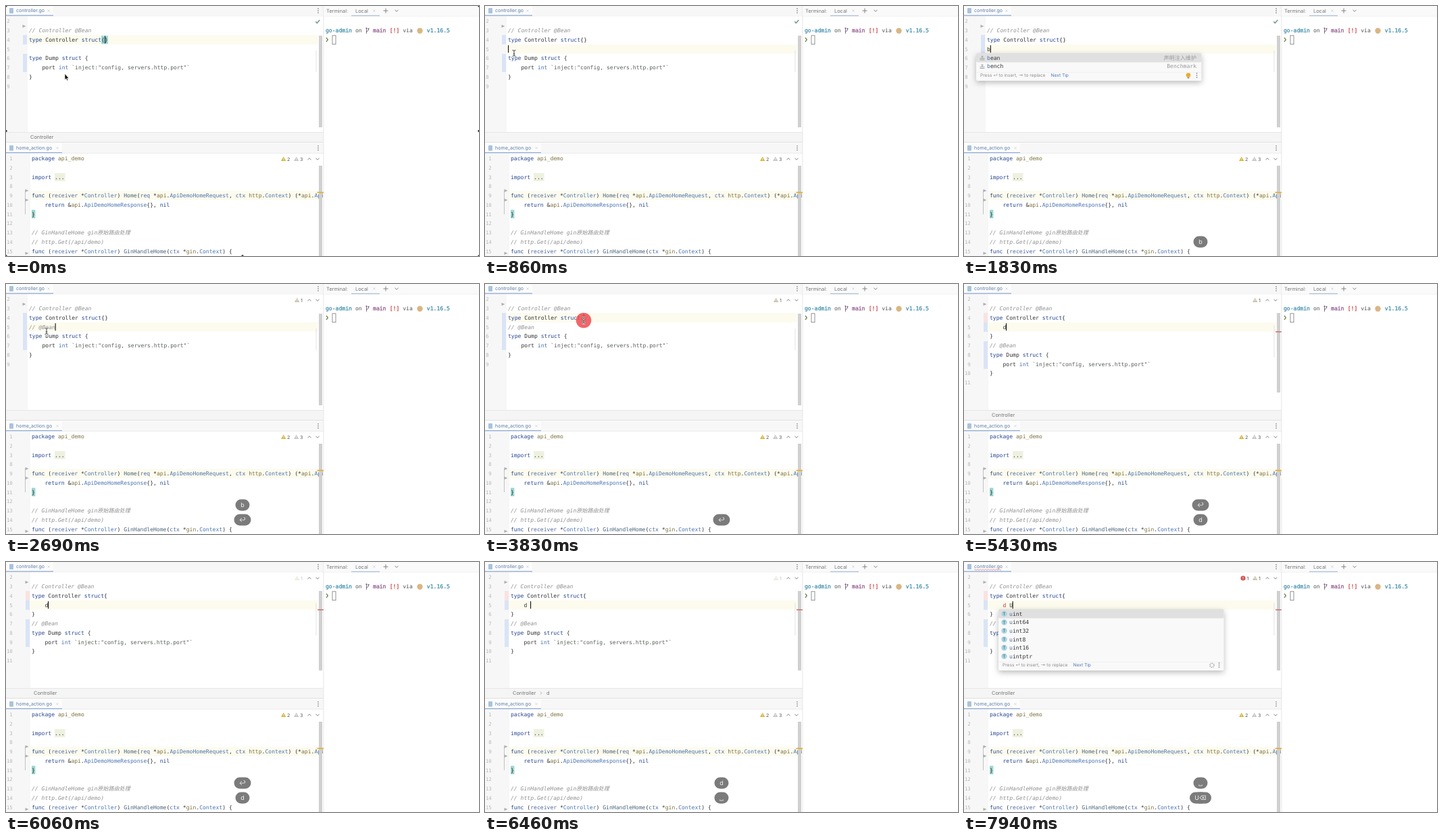
An HTML page that plays this animation: 700 by 371 pixels, repeating every 8 s.

```html
<!DOCTYPE html>
<html lang="en">
<head>
<meta charset="utf-8">
<title>Editor demo</title>
<style>
  html, body { margin: 0; width: 100%; height: 100%; overflow: hidden; background: #fff; }
  svg { display: block; width: 100vw; height: 100vh; }
  text { white-space: pre; text-rendering: geometricPrecision; }
  .mono { font: 8.09px "DejaVu Sans Mono", "Noto Sans CJK SC", "Noto Sans CJK", monospace; fill: #333; }
  .ui { font: 7.1px Inter, Roboto, "DejaVu Sans", sans-serif; fill: #555; }
  .title { fill: #5c7ca8; }
  .crumb { font-size: 7.4px; fill: #777; }
  .tip { font-size: 6.6px; fill: #8c8c8c; }
  .num { font-size: 7.4px; fill: #b8b8b8; text-anchor: end; }
  .end { text-anchor: end; }
  .key { font: 9px Inter, "DejaVu Sans", sans-serif; fill: #f4f4f4; text-anchor: middle; }
  .strong { stroke: currentColor; stroke-width: .25; }
  .comment { fill: #8f8f8f; font-style: italic; }
  .word { fill: #26468f; }
  .type { fill: #4a72b2; }
  .string { fill: #575f57; }
  .pkg { fill: #7d713f; }
  .func { fill: #48627a; }
  .name { fill: #4f69a0; }
  .error { fill: #c43a3a; }
  .line { fill: none; stroke: #777; stroke-width: .9; }
  .popup { filter: drop-shadow(0 3px 4px #0004); }
</style>
</head>
<body>
<svg id="stage" viewBox="0 0 700 371" preserveAspectRatio="none"></svg>
<script>
const LOOP = 8000;
const PITCH = 13.75;
const BEAN = 2060, CLICK = 3800, ENTER = 4230, SPACE = 6230, UPPER = 7430;
const parts = [];

const add = svg => parts.push(svg);
const at = (from, to, ...svg) =>
  parts.push(`<g data-from="${from}" data-to="${to}">${svg.join('')}</g>`);

const rect = (x, y, w, h, fill, more = '') =>
  `<rect x="${x}" y="${y}" width="${w}" height="${h}" fill="${fill}" ${more}/>`;
const path = (d, more = '') => `<path class="line" d="${d}" ${more}/>`;
const label = (x, y, str, cls = 'ui') => `<text class="${cls}" x="${x}" y="${y}">${str}</text>`;
const dots = (x, y) => [-3, 0, 3].map(d => `<circle cx="${x}" cy="${y + d}" r=".8" fill="#666"/>`).join('');
const up = (x, y) => path(`M${x - 2.5} ${y + 1.3}l2.5-2.6 2.5 2.6`);
const down = (x, y) => path(`M${x - 2.5} ${y - 1.3}l2.5 2.6 2.5-2.6`);
const cross = (x, y) => path(`M${x - 1.6} ${y - 1.6}l3.2 3.2m0-3.2l-3.2 3.2`, 'style="stroke:#d5d5d5"');

// Syntax colouring
const RULES = [
  ['comment', '//.*'],
  ['string', '`.*`'],
  ['word', '\\b(?:type|struct|func|return|package|import|nil)\\b'],
  ['type', '\\b(?:int|ApiDemo\\w+|Api$|Context|Controller(?=\\)))\\b'],
  ['func', '\\b(?:Home|GinHandleHome)(?=\\()'],
  ['pkg', '\\b(?:api_demo|api|http|gin)\\b'],
  ['name', '\\b(?:receiver|req|ctx)\\b']
];
const SYNTAX = new RegExp(RULES.map(([, r]) => `(${r})`).join('|'), 'g');
const paint = src => src.replace(SYNTAX, (hit, ...groups) =>
  `<tspan class="${RULES[groups.findIndex((g, i) => i < RULES.length && g)][0]}">${hit}</tspan>`);

const rowY = n => 50 + PITCH * (n - 4);
const code = (x, y, src) => label(x, y + 2.9, paint(src), 'mono');
const number = (x, y, n) => label(x, y + 2.8, n, 'mono num');
const numbers = (x, last) => {
  let out = '';
  for (let n = 2; n <= last; n++) out += number(x, rowY(n), n);
  return out;
};
const rowBand = n => rect(32, rowY(n) - 6.8, 430, 13.6, '#fcfbee');
const caret = (x, n) => rect(x, rowY(n) - 5.5, 1.1, 11, '#111');
const changed = (x, top, bottom, fill = '#dae4f6') => rect(x, top, 6, bottom - top, fill);
const fold = (x, y) => `<path d="M${x - 2.5} ${y - 2.3}l5 2.3-5 2.3z" fill="#b0b0b0"/>`;

const warning = (x, y, n, color, opacity = 1) => `<g opacity="${opacity}">
  <path d="M${x} ${y + 3}l3.7-6.4 3.7 6.4z" fill="${color}"/>
  <path d="M${x + 3.7} ${y - 1.2}v2m0 .7v.7" stroke="#fff" stroke-width=".8"/>
  ${label(x + 9, y + 2.6, n)}</g>`;
const arrows = y => up(449, y) + down(461, y);

// Editor frames and terminal
const tab = (y, title, width) => rect(0, y, 470, 14.5, '#f7f7f7')
  + rect(0, y, width, 14, '#fcfcfc') + rect(0, y + 13.4, width, 1.2, '#86a5d0')
  + rect(5, y + 3, 6, 8, '#a9c3de', 'rx="1"')
  + label(15, y + 9.4, title, 'ui title') + cross(width - 7, y + 7) + dots(462, y + 7);

add(rect(0, 0, 700, 371, '#fff'));
at(0, ENTER, rect(0, 15, 32, 172, '#f7f7f7'));
at(ENTER, LOOP, rect(0, 15, 36, 172, '#f7f7f7'));
add(rect(0, 217, 36, 154, '#f7f7f7'));
add(rect(0, 14.6, 470, .6, '#e2e2e2') + tab(0, 'controller.go', 70));
add(rect(0, 187, 470, 15, '#f5f5f5') + rect(0, 187, 470, .6, '#dedede'));
add(tab(203.7, 'home_action.go', 83) + rect(0, 201.8, 470, .8, '#d5d5d5') + rect(83, 218, 387, .6, '#e2e2e2'));
add(rect(469.5, 0, .9, 371, '#e3e3e3') + rect(470.4, 0, 229.6, 15, '#fafafa') + rect(470.4, 14.8, 229.6, .6, '#e8e8e8'));
add(label(474, 9.7, 'Terminal:', 'ui crumb') + label(517, 9.7, 'Local', 'ui crumb')
  + rect(511, 13.8, 42, 1.1, '#a3b9d6') + cross(545, 7)
  + path('M558.5 7h7m-3.5-3.5v7') + down(578, 7));

const prompt = [
  [0, 'go-admin', '#3f8dab', 'strong'], [9, 'on', '#555', ''], [14.35, 'main', '#8f5389', 'strong'],
  [19.4, '[!]', '#cc4646', 'strong'], [23.4, 'via', '#555', ''], [30.7, 'v1.16.5', '#3f8dab', 'strong']
];
for (const [col, str, color, weight] of prompt)
  add(`<text class="mono ${weight}" x="${473 + col * 4.88}" y="39.4" style="fill:${color};color:${color}">${str}</text>`);
add(path('M533.5 41v-8m0 5q3-.5 3-3.5', 'style="stroke:#765b78"')
  + '<circle cx="533.5" cy="33" r="1.1" fill="#765b78"/><circle cx="536.5" cy="33.8" r="1.1" fill="#765b78"/>');
add('<circle cx="612.5" cy="36.7" r="4.2" fill="#dab682"/>');
add(path('M474 46.8l2.3 3.2-2.3 3.2', 'style="stroke:#678444;stroke-width:1.3"')
  + '<rect x="483" y="43.8" width="5" height="13" fill="none" stroke="#777" stroke-width=".8"/>');

// Lower editor
const lower = {
  1: 'package api_demo', 2: '', 3: 'import ...', 8: '',
  9: 'func (receiver *Controller) Home(req *api.ApiDemoHomeRequest, ctx http.Context) (*api.Api',
  10: '    return &amp;api.ApiDemoHomeResponse{}, nil', 11: '}', 12: '',
  13: '// GinHandleHome gin原始路由处理', 14: '// http.Get(/api/demo)',
  15: 'func (receiver *Controller) GinHandleHome(ctx *gin.Context) {'
};
add(rect(36, 274.5, 434, 13.6, '#fcfbee') + rect(72, 248, 15.5, 12, '#eef1df') + rect(38, 302.5, 5.4, 12.5, '#9bd5d0'));
add('<clipPath id="pane"><rect y="217" width="469" height="154"/></clipPath><g clip-path="url(#pane)">'
  + Object.entries(lower).map(([n, src], i) =>
    number(9.8, 226.3 + i * PITCH, n) + code(38, 226.3 + i * PITCH, src)).join('') + '</g>');
add(path('M28.5 274v35', 'style="stroke:#bbb"') + fold(31, 274) + fold(31, 288) + fold(31, 367));
add(warning(407, 227, 2, '#d9b53b') + warning(426, 227, 3, '#c6c6c6') + arrows(227));
add(rect(463, 237, 5, 134, '#d0d0d0') + rect(460.5, 275.8, 9.5, 1.8, '#e5ad35'));

// Upper editor
at(0, 700, rowBand(4));
at(700, CLICK, rowBand(5));
at(CLICK, ENTER, rowBand(4));
at(ENTER, LOOP, rowBand(5));
for (const span of [[0, 700], [3890, ENTER]])
  at(...span, rect(141, 44, 10, 12.4, '#a0dcdc'));

at(0, 1260, changed(25, 43, 57), changed(25, 71, 98));
at(1260, BEAN, changed(25, 43, 98));
at(BEAN, ENTER, changed(25, 43, 98));
at(ENTER, LOOP, changed(29, 43, 57, '#fae2e0'), changed(29, 57, 71), changed(29, 85, 126));

const dump = ['type Dump struct {', '    port int `inject:"config, servers.http.port"`', '}'];
const block = (x, first, lines) => lines.map((src, i) => code(x, rowY(first + i), src)).join('');
at(0, ENTER, numbers(5.6, 9), fold(27, 30),
  block(34, 3, ['// Controller @Bean', 'type Controller struct{}']), block(34, 6, dump));
at(ENTER, LOOP, numbers(9.8, 11), fold(31, 30),
  block(38, 3, ['// Controller @Bean', 'type Controller struct{']),
  block(38, 6, ['}', '// @Bean', ...dump]));

at(0, 700, caret(146, 4));
at(700, 1260, caret(34, 5));
at(1260, BEAN, code(34, rowY(5), 'b'), caret(38.8, 5));
at(BEAN, ENTER, code(34, rowY(5), '// @Bean'));
at(BEAN, CLICK, caret(72.6, 5));
at(CLICK, ENTER, caret(145.6, 4));
at(ENTER, 5430, caret(57.5, 5));
at(5430, 6740, code(57.5, rowY(5), 'd'));
at(5430, SPACE, caret(62, 5));
at(SPACE, 6740, caret(67, 5));
at(7260, UPPER, caret(67, 5));
at(6740, LOOP, label(57.5, rowY(5) + 2.9, 'd', 'mono error'));
at(UPPER, LOOP, code(67.2, rowY(5), 'U'), caret(71.6, 5));

at(0, ENTER, rect(463, 44, 5, 136, '#d0d0d0'), rect(458.6, 66, .8, 32, '#dcdcdc'));
at(ENTER, LOOP, rect(463, 43, 5, 118, '#d0d0d0'), rect(458.6, 61, .8, 48, '#dcdcdc'));
at(5030, LOOP, rect(461, 70.3, 9, 1.3, '#cc625b'));

at(0, BEAN, path('M458.3 23l2 2.2 4-4.4', 'style="stroke:#7b9c8a;stroke-width:1.6"'));
at(2520, LOOP, arrows(24));
const faded = [[4570, 5030], [6060, 7090]];
for (const span of [[2520, 4570], [5030, 6060], [7090, LOOP]])
  at(...span, warning(427, 24, 1, '#c9c3ab'));
for (const span of faded) at(...span, warning(427, 24, 1, '#c9c3ab', .35));
at(7090, LOOP, '<circle cx="413" cy="24" r="3.6" fill="#d65050"/>',
  path('M413 22v2.3m0 .8v.8', 'style="stroke:#fff"'), label(418.5, 26.6, 1));
at(6740, LOOP, path('M15 11.5' + 'q1-1.6 2 0t2 0'.repeat(10), 'style="stroke:#dc6b64;stroke-width:.7"'));

const crumb = x => label(x, 197.3, 'Controller', 'ui crumb');
at(0, 700, crumb(36));
at(3940, ENTER, crumb(36));
at(ENTER, LOOP, crumb(41));
at(SPACE, UPPER, path('M82 192.6l1.8 2-1.8 2', 'style="stroke:#aaa"') + label(91, 197.3, 'd', 'ui crumb'));

// Completion popups
const popup = (x, h, rows, icon) => {
  const list = rows.map(([name, note], i) => {
    const y = 76.9 + i * 12.6;
    return icon(y) + label(x, y + 2.9, `<tspan class="type">${name[0]}</tspan>${name.slice(1)}`, 'mono')
      + (note ? `<text class="mono end" x="${x + 310}" y="${y + 2.9}" style="fill:#999">${note}</text>` : '');
  }).join('');
  const left = x - 16, w = 333.5, foot = 70 + h - 6;
  return rect(left, 70, w, h, '#f9f9f9', 'rx="2" class="popup"')
    + rect(left, 70, w, 13.4, '#e0e0e0', 'rx="2"') + list
    + rect(left, foot - 7, w, .5, '#e8e8e8')
    + label(left + 6, foot, 'Press ↵ to insert, ⇥ to replace', 'ui tip')
    + `<text class="ui tip" x="${left + 110.5}" y="${foot}" style="fill:#4a79b8">Next Tip</text>`
    + dots(left + w - 7, foot - 2);
};
const stamp = y => path(`M23.5 ${y + 3}h7m-7-2.2h7m-3.5 0v-3m-1.6 0h3.2`, 'style="stroke:#999"');
const typeIcon = y => `<circle cx="59.5" cy="${y}" r="4.2" fill="#a5d3df"/>`
  + `<text class="ui" x="59.5" y="${y + 2.1}" text-anchor="middle" style="font-size:6px">T</text>`;

at(1370, BEAN, popup(34, 41, [['bean', '声明注入维护'], ['bench', 'Benchmark']], stamp));
at(1830, BEAN, '<circle cx="332" cy="102.6" r="3.3" fill="#e9ae2c"/>' + rect(330.6, 105.8, 2.8, 1.6, '#8b8b8b'));
at(7550, LOOP, popup(67, 91,
  ['uint', 'uint64', 'uint32', 'uint8', 'uint16', 'uintptr'].map(n => [n]), typeIcon));
at(7890, LOOP, '<circle cx="367" cy="153.3" r="3" fill="none" stroke="#999" stroke-width="1.6" stroke-dasharray="1.1 1.256"/>');

// Capture handles on the stage edges
at(0, 60, [[0, 0], [700, 0], [0, 185.5], [700, 185.5], [0, 371], [350, 371], [700, 371]]
  .map(([x, y]) => `<circle cx="${x}" cy="${y}" r="1.7" fill="#333"/>`).join(''));

// Pointer and key presses
const BEAM = 'M-2.5-4.5q2.5 0 2.5 1.6v5.8q0 1.6-2.5 1.6m5-9q-2.5 0-2.5 1.6m0 5.8q0 1.6 2.5 1.6M-1.4 1h2.8';
add('<g id="pointer"><circle id="press" r="11.3" fill="#ee4b50" opacity=".85"/>'
  + '<path id="arrow" d="M0-4.5v9l2-1.8 1.4 3 1.4-.7-1.4-2.8h2.7z" fill="#111" stroke="#fff" stroke-width=".6"/>'
  + `<g id="beam">${path(BEAM, 'style="stroke:#fff;stroke-width:2"')}${path(BEAM, 'style="stroke:#333"')}</g></g>`);

const pill = (w, str) => rect(350 - w / 2, -8.5, w, 17, '#7b7b7b', 'rx="8.5"') + label(350, 3.2, str, 'key');
const keys = [
  [1260, 'b', 21], [BEAN, '↩', 25], [ENTER, '↩', 25],
  [5430, 'd', 21], [SPACE, '␣', 21], [UPPER, 'U', 21]
];
const HOLD = 2000;
keys.forEach(([, str, w], i) => add(`<g id="key${i}">${pill(w, str)}</g>`));
at(7890, LOOP, `<g transform="translate(0 350)">${pill(32, 'U⌫')}</g>`);

const $ = id => document.getElementById(id);
$('stage').innerHTML = parts.join('');
const timed = [...document.querySelectorAll('[data-from]')]
  .map(el => ({ el, from: +el.dataset.from, to: +el.dataset.to }));
const show = (el, on) => { el.style.display = on ? '' : 'none'; };
const within = (t, from, to) => t >= from && t < to;

const route = [
  [0, 87, 105], [60, 87, 105], [640, 43, 70], [860, 43, 70], [1090, 57, 70],
  [2690, 60, 70], [2800, 50, 61], [2920, 55, 58], [3090, 57, 58], [3740, 146, 54], [LOOP, 146, 54]
];
function pointerAt(t) {
  const i = route.findIndex(p => p[0] > t);
  const [t0, x0, y0] = route[i - 1], [t1, x1, y1] = route[i];
  const u = (t - t0) / (t1 - t0), k = u * u * (3 - 2 * u);
  return [x0 + (x1 - x0) * k, y0 + (y1 - y0) * k];
}

function draw(t) {
  for (const { el, from, to } of timed) show(el, within(t, from, to));

  const [x, y] = pointerAt(t);
  $('pointer').setAttribute('transform', `translate(${x} ${y})`);
  show($('pointer'), t < 1260 || within(t, 2690, ENTER));
  show($('arrow'), t < 120);
  show($('beam'), t >= 120);
  show($('press'), within(t, 690, 860) || within(t, CLICK, 4000));

  // Each press stays for a while; newer ones push it up.
  const live = keys.filter(([start]) => within(t, start, start + HOLD));
  keys.forEach((key, i) => {
    const place = live.indexOf(key);
    show($('key' + i), place >= 0);
    $('key' + i).setAttribute('transform', `translate(0 ${350 - 22 * (live.length - 1 - place)})`);
  });
}

const start = performance.now();
function tick() {
  draw((performance.now() - start) % LOOP);
  requestAnimationFrame(tick);
}
tick();
</script>
</body>
</html>
```
